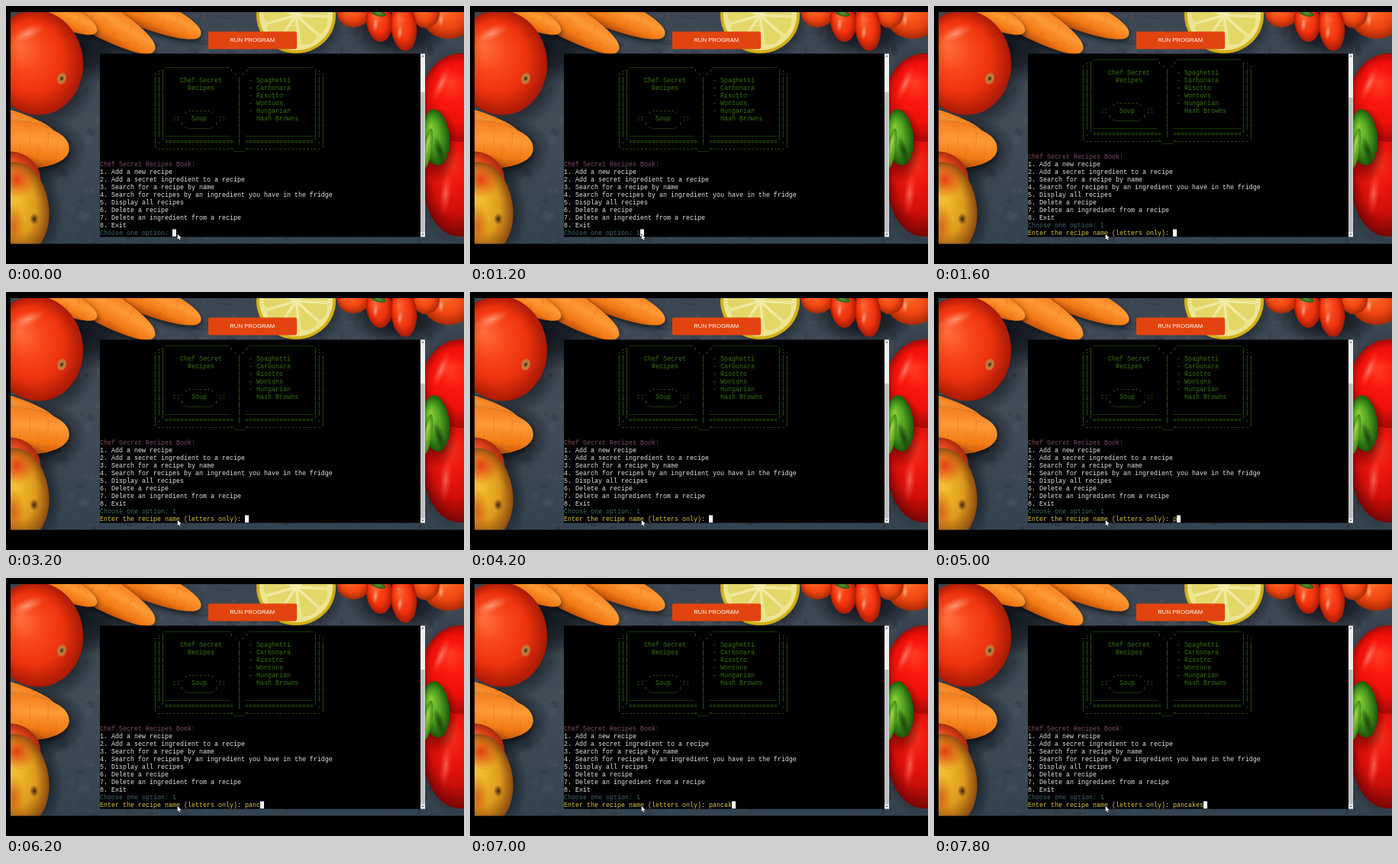
Write an HTML page with a canvas that moves like this. It is 600x338 px and loops after 8000 ms.

```html
<!DOCTYPE html>
<html lang="en">
<head>
<meta charset="utf-8">
<title>Recipe book terminal</title>
<style>
html, body { margin: 0; width: 100%; height: 100%; overflow: hidden; background: #000; }
canvas { display: block; width: 600px; height: 338px; }
</style>
</head>
<body>
<canvas id="stage"></canvas>
<script>
const W = 600, H = 338, LOOP = 8000;
const CHAR = 5, LINE = 10, LEFT = 123, BASE = 300;
const ratio = window.devicePixelRatio || 1;

function sized(canvas) {
  canvas.width = Math.round(W * ratio);
  canvas.height = Math.round(H * ratio);
  const c = canvas.getContext('2d');
  c.scale(ratio, ratio);
  return c;
}

const ctx = sized(document.getElementById('stage'));
const backdrop = document.createElement('canvas');
const bg = sized(backdrop);

function seeded(seed) {
  return () => (seed = (seed * 16807) % 2147483647) / 2147483647;
}

// Shaded ellipse, lit from (hx, hy) in unit coordinates.
function blob(x, y, rx, ry, turn, colors, hx = -0.3, hy = -0.35) {
  bg.save();
  bg.translate(x, y);
  bg.rotate(turn);
  bg.scale(rx, ry);
  const g = bg.createRadialGradient(hx, hy, 0.05, 0, 0, 1);
  colors.forEach((c, i) => g.addColorStop(i / (colors.length - 1), c));
  bg.fillStyle = g;
  bg.beginPath();
  bg.arc(0, 0, 1, 0, 7);
  bg.fill();
  bg.restore();
}

// Tapered root from (x, y) to its tip, with a few skin creases.
function carrot(x, y, length, width, turn) {
  bg.save();
  bg.translate(x, y);
  bg.rotate(turn);
  bg.shadowColor = 'rgba(10,14,20,.8)';
  bg.shadowBlur = 7 * ratio;
  bg.shadowOffsetY = 3 * ratio;
  const g = bg.createLinearGradient(0, -width / 2, 0, width / 2);
  g.addColorStop(0, '#f57d1c');
  g.addColorStop(0.35, '#fd9a35');
  g.addColorStop(0.7, '#f27a14');
  g.addColorStop(1, '#b8480a');
  bg.fillStyle = g;
  bg.beginPath();
  bg.moveTo(0, -width / 2);
  bg.bezierCurveTo(length * 0.6, -width * 0.5, length, -width * 0.35, length, 0);
  bg.bezierCurveTo(length, width * 0.3, length * 0.6, width * 0.5, 0, width / 2);
  bg.fill();
  bg.shadowColor = 'transparent';
  bg.strokeStyle = 'rgba(190,80,10,.3)';
  bg.lineWidth = 0.8;
  for (let i = 1; i < 7; i++) {
    const px = length * i / 7.5, side = i % 2 ? -1 : 1;
    bg.beginPath();
    bg.moveTo(px, side * width * 0.32);
    bg.quadraticCurveTo(px + 3, side * width * 0.15, px + 1, 0);
    bg.stroke();
  }
  bg.restore();
}

function lemon(x, y, rx, ry) {
  blob(x, y, rx, ry, 0, ['#f0dc3c', '#ead62e', '#cfae14'], 0, 0);
  blob(x, y, rx - 4, ry - 4, 0, ['#f1eba6', '#ece492'], 0, 0);
  const at = (t, k) => [x + Math.cos(t) * rx * k, y + Math.sin(t) * ry * k];
  bg.fillStyle = '#e3d768';
  for (let i = 0; i < 9; i++) {
    const a = i * Math.PI * 2 / 9 + 0.1, b = a + 0.6, mid = (a + b) / 2;
    bg.beginPath();
    bg.moveTo(...at(mid, 0.1));
    bg.lineTo(...at(a, 0.78));
    bg.quadraticCurveTo(...at(mid, 0.9), ...at(b, 0.78));
    bg.fill();
  }
}

function slate() {
  const g = bg.createLinearGradient(0, 8, 0, 312);
  g.addColorStop(0, '#3c4652');
  g.addColorStop(0.5, '#414c57');
  g.addColorStop(1, '#33434f');
  bg.fillStyle = g;
  bg.fillRect(0, 0, W, H);
  const rnd = seeded(41);
  for (let i = 0; i < 420; i++) {
    const light = rnd() > 0.5;
    bg.fillStyle = light ? 'rgba(130,145,160,.07)' : 'rgba(8,14,22,.12)';
    bg.beginPath();
    bg.ellipse(rnd() * W, rnd() * H, 1 + rnd() * 9, 1 + rnd() * 4, rnd() * 3, 0, 7);
    bg.fill();
  }
}

function paintPhoto() {
  bg.fillStyle = '#000';
  bg.fillRect(0, 0, W, H);
  bg.save();
  bg.beginPath();
  bg.rect(6, 8, 594, 303.5);
  bg.clip();
  slate();

  const dark = ['rgba(8,12,18,.85)', 'rgba(8,12,18,.6)', 'rgba(8,12,18,0)'];
  const red = ['#ff6a3a', '#f8481a', '#ee330e', '#a81a06'];
  const orange = ['#ff8a44', '#fb5c1c', '#ee4410', '#a82a06'];

  blob(90, 50, 90, 46, 0.3, dark, 0, 0);
  carrot(150, -6, 114, 44, 0.4);
  carrot(84, -6, 128, 48, 0.53);
  carrot(36, -6, 92, 36, 0.45);

  blob(54, 96, 66, 66, 0, dark, 0, 0);
  blob(40, 74, 61, 69, -0.15, red);
  blob(28, 36, 24, 9, -0.4, ['rgba(255,205,180,.55)', 'rgba(255,150,120,0)'], 0, 0);
  blob(73, 95, 6, 8, 0.3, ['#3b2a10', '#b08a4c', '#d85a20'], 0, 0);

  blob(40, 190, 66, 50, 0, dark, 0, 0);
  carrot(-6, 152, 76, 38, 0.3);
  carrot(-6, 181, 89, 64, 0.08);

  blob(28, 262, 46, 70, -0.2, dark, 0, 0);
  blob(8, 225, 38, 34, 0.4, ['#f2682a', '#e2461a', '#a82a0e']);
  blob(17, 264, 39, 60, -0.15, ['#f4c93a', '#edb428', '#dd9a1c', '#8c4a10']);
  blob(14, 228, 26, 24, -0.2, ['rgba(226,54,20,.85)', 'rgba(226,70,20,0)'], 0, 0);
  blob(10, 288, 14, 30, 0, ['rgba(215,80,20,.7)', 'rgba(215,90,20,0)'], 0, 0);
  blob(37, 279, 6, 8, 0, ['#3c240c', 'rgba(110,60,20,0)'], 0, 0);

  blob(386, 24, 58, 50, 0, dark, 0, 0);
  lemon(380, 12, 52, 50);

  blob(514, 30, 70, 42, 0.1, dark, 0, 0);
  blob(455, 8, 22, 20, 0.1, orange);
  blob(580, 11, 36, 32, 0, orange);
  blob(550, 9, 18, 20, 0, orange);
  blob(489, 20, 17, 27, -0.1, red);
  blob(521, 27, 17, 32, -0.1, red);
  for (const [x, y] of [[484, 24], [516, 34], [570, 18]]) {
    blob(x, y, 4, 10, 0.1, ['rgba(255,215,190,.65)', 'rgba(255,160,120,0)'], 0, 0);
  }
  blob(487, 9, 11, 4, 0.3, ['#5d9434', '#2f5a18'], 0, 0);

  blob(586, 182, 60, 132, 0, dark, 0, 0);
  blob(594, 228, 48, 74, 0, ['#f8321c', '#ee160c', '#d00e08', '#780604']);
  blob(596, 120, 51, 58, 0, ['#ff3a24', '#fb180e', '#ee1009', '#a80a06']);
  blob(570, 102, 7, 26, 0.4, ['rgba(255,170,150,.6)', 'rgba(255,90,70,0)'], 0, 0);
  blob(566, 182, 26, 50, 0, ['rgba(50,4,4,.95)', 'rgba(80,4,4,.6)', 'rgba(90,4,4,0)'], 0, 0);
  blob(563, 172, 18, 37, -0.1, ['#86cc36', '#4fa020', '#1d5a0c']);
  blob(553, 186, 5, 26, 0.15, ['#9ad850', '#3f8a1c']);
  blob(568, 190, 6, 20, -0.3, ['#1d4a0c', 'rgba(24,64,10,0)'], 0, 0);
  blob(576, 246, 8, 30, 0.1, ['rgba(255,150,130,.55)', 'rgba(255,80,60,0)'], 0, 0);
  bg.restore();

  bg.fillStyle = '#e2440f';
  bg.beginPath();
  bg.roundRect(265, 33.5, 116, 23, 2.5);
  bg.fill();
  bg.fillStyle = '#fff';
  bg.font = '7.75px "Liberation Sans", Arial, sans-serif';
  bg.textAlign = 'center';
  bg.fillText('RUN PROGRAM', 322.7, 47.2);
}

const GREEN = '#38760f', MAUVE = '#7d4a68', TEAL = '#40696f';
const WHITE = '#e6e6e6', YELLOW = '#dcc840';

// Places [column, text] pairs on one line.
function row(...parts) {
  return parts.reduce((s, [col, text]) => s.padEnd(col) + text, '');
}
const rule = (n, c = '_') => c.repeat(n);
const page = (...parts) => row([14, '|||'], ...parts, [56, '|||']);

const book = [
  row([17, rule(17)], [39, rule(17)]),
  row([14, '.:|'], [34, "'. .'"], [56, '|:.']),
  page([21, 'Chef Secret'], [36, '|'], [39, '- Spaghetti']),
  page([23, 'Recipes'], [36, '|'], [39, '- Carbonara']),
  page([36, '|'], [39, '- Risotto']),
  page([36, '|'], [39, '- Wontons']),
  page([22, '.------.'], [36, '|'], [39, '- Hungarian']),
  page([19, '::`  Soup  `::'], [36, '|'], [41, 'Hash Browns']),
  page([21, "'.______.'"], [36, '|']),
  page([17, rule(17)], [36, '|'], [38, rule(18)]),
  row([14, "|.'"], [17, rule(18, '=')], [36, '|'], [38, rule(18, '=')], [56, "'.|"]),
  row([14, "'" + rule(19, '-') + '~___~' + rule(19, '-') + "'"]),
  ''
];
const menu = [
  '1. Add a new recipe',
  '2. Add a secret ingredient to a recipe',
  '3. Search for a recipe by name',
  '4. Search for recipes by an ingredient you have in the fridge',
  '5. Display all recipes',
  '6. Delete a recipe',
  '7. Delete an ingredient from a recipe',
  '8. Exit'
];
const heading = [
  ...book.map(text => [text, GREEN]),
  ['Chef Secret Recipes Book:', MAUVE],
  ...menu.map(text => [text, WHITE])
];

const CHOICE_AT = 1000, ENTER_AT = 1400, TYPE_AT = 4800, KEY_GAP = 400;
const WORD = 'pancakes';

function screenLines(t) {
  const lines = [...heading, ['Choose one option: ' + (t >= CHOICE_AT ? '1' : ''), TEAL]];
  if (t >= ENTER_AT) {
    const typed = Math.max(0, Math.floor((t - TYPE_AT) / KEY_GAP) + 1);
    lines.push(['Enter the recipe name (letters only): ' + WORD.slice(0, typed), YELLOW]);
  }
  return lines;
}

function triangle(x, y, dir) {
  ctx.fillStyle = '#505050';
  ctx.beginPath();
  ctx.moveTo(x - 1.6, y + dir);
  ctx.lineTo(x + 1.6, y + dir);
  ctx.lineTo(x, y - dir);
  ctx.fill();
}

function scrollbar(top) {
  ctx.fillStyle = '#f1f1f1';
  ctx.fillRect(543, 62.5, 6, 240);
  ctx.fillStyle = '#c1c1c1';
  ctx.fillRect(543, top, 5.5, 296.5 - top);
  triangle(546, 65.5, 1);
  triangle(546, 299.5, -1);
}

function pointer(x, y) {
  const shape = [[0, 0], [0, 7.4], [1.7, 5.9], [2.8, 8.4], [4, 7.9], [2.9, 5.4], [5.1, 5.3]];
  ctx.beginPath();
  shape.forEach(([dx, dy]) => ctx.lineTo(x + dx, y + dy));
  ctx.closePath();
  ctx.lineWidth = 1;
  ctx.strokeStyle = '#000';
  ctx.stroke();
  ctx.fillStyle = '#fff';
  ctx.fill();
}

function draw(t) {
  ctx.drawImage(backdrop, 0, 0, W, H);
  ctx.fillStyle = '#000';
  ctx.fillRect(123, 62.5, 420, 240);

  const lines = screenLines(t), last = lines.length - 1;
  ctx.font = '8.333px "Liberation Mono", "Courier New", monospace';
  lines.forEach(([text, color], i) => {
    ctx.fillStyle = color;
    ctx.fillText(text, LEFT, BASE - (last - i) * LINE);
  });
  ctx.fillStyle = '#fff';
  ctx.fillRect(LEFT + lines[last][0].length * CHAR, 292.5, CHAR, 9.5);

  scrollbar(t >= ENTER_AT ? 120 : 112.5);
  pointer(224.7, 298.7);
}

paintPhoto();
const start = performance.now();
function tick() {
  draw((performance.now() - start) % LOOP);
  requestAnimationFrame(tick);
}
tick();
</script>
</body>
</html>
```
